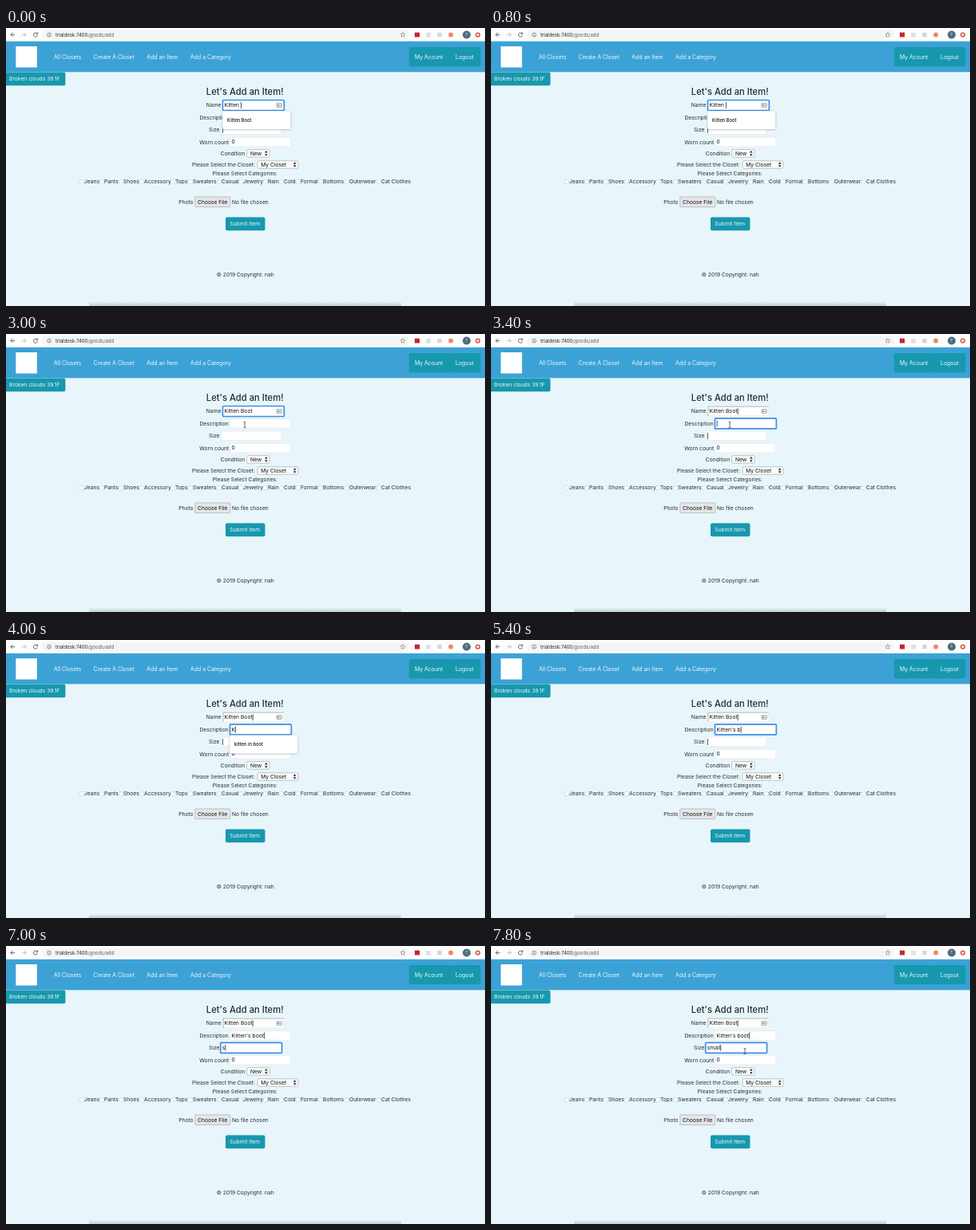
Animation of 600 by 349 pixels, one loop 8000 ms. Source, as an HTML page with a canvas:

```html
<!DOCTYPE html>
<html lang="en">
<head>
<meta charset="utf-8">
<title>Add an item</title>
<style>
html, body { margin: 0; width: 100%; height: 100%; overflow: hidden; background: #e8f6fb; }
canvas { display: block; width: 600px; height: 349px; }
</style>
</head>
<body>
<canvas id="stage"></canvas>
<script>
const W = 600, H = 349, LOOP = 8000, STEP = 200;
const canvas = document.getElementById('stage');
const ctx = canvas.getContext('2d');
const ratio = window.devicePixelRatio || 1;
canvas.width = Math.round(W * ratio);
canvas.height = Math.round(H * ratio);

const FAMILY = 'Inter, Roboto, sans-serif';
const INK = '#262b2f', TEAL = '#1798ae', BODY = 6.72;
const CATEGORIES = [
  ['Jeans', 98], ['Pants', 123], ['Shoes', 147], ['Accessory', 173],
  ['Tops', 212], ['Sweaters', 234], ['Casual', 270], ['Jewelry', 297],
  ['Rain', 328], ['Cold', 348], ['Formal', 369], ['Bottoms', 397],
  ['Outerwear', 430], ['Cat Clothes', 470]
];

// Typed values: [start time, text]
const NAME = [[0, 'Kitten '], [1200, 'Kitten B'], [1600, 'Kitten Bu'], [1800, 'Kitten B'],
  [2000, 'Kitten Bo'], [2200, 'Kitten Boo'], [2400, 'Kitten Boot']];
const DESCRIPTION = "Kitten's boot";
const SIZE = 'small';

function text(str, x, y, color = INK, size = BODY, weight = 400) {
  ctx.font = `${weight} ${size}px ${FAMILY}`;
  ctx.fillStyle = color;
  ctx.fillText(str, x, y);
  return ctx.measureText(str).width;
}

function rect(x, y, w, h, color) {
  ctx.fillStyle = color;
  ctx.fillRect(x, y, w, h);
}

function box(x, y, w, h, radius, fill, stroke, line = 0.6) {
  ctx.beginPath();
  ctx.roundRect(x, y, w, h, radius);
  if (fill) { ctx.fillStyle = fill; ctx.fill(); }
  if (stroke) { ctx.strokeStyle = stroke; ctx.lineWidth = line; ctx.stroke(); }
}

function disc(x, y, r, color) {
  ctx.fillStyle = color;
  ctx.beginPath();
  ctx.arc(x, y, r, 0, 7);
  ctx.fill();
}

function lines(color, width, ...paths) {
  ctx.strokeStyle = color;
  ctx.lineWidth = width;
  ctx.beginPath();
  for (const p of paths)
    for (let i = 0; i < p.length; i += 2)
      i ? ctx.lineTo(p[i], p[i + 1]) : ctx.moveTo(p[i], p[i + 1]);
  ctx.stroke();
}

function arrow(x, dir, color) {
  lines(color, 0.9, [x - 2.6 * dir, 8.4, x + 2.6 * dir, 8.4],
    [x, 5.8, x + 2.6 * dir, 8.4, x, 11]);
}

function star(x, y, r) {
  const p = [];
  for (let i = 0; i <= 10; i++) {
    const a = i * Math.PI / 5 - Math.PI / 2, d = i % 2 ? r * 0.45 : r;
    p.push(x + d * Math.cos(a), y + d * Math.sin(a));
  }
  lines('#6b6f73', 0.55, p);
}

function drawToolbar() {
  rect(0, 0, W, 17, '#fdfdfd');
  box(45, 2.5, 460, 12, 6, '#f4f5f6');
  arrow(8.5, -1, '#55595d');
  arrow(22.5, 1, '#b9bcbf');
  ctx.strokeStyle = '#55595d';
  ctx.lineWidth = 0.9;
  ctx.beginPath();
  ctx.arc(37, 8.5, 2.6, 0.3, 5.5);
  ctx.stroke();
  lines('#55595d', 0.9, [39.6, 5.4, 39.6, 7.7, 37.4, 7.7]);
  ctx.lineWidth = 0.6;
  ctx.beginPath();
  ctx.arc(54, 8.5, 2.5, 0, 7);
  ctx.stroke();
  rect(53.7, 8, 0.7, 2, '#55595d');
  rect(53.7, 6.8, 0.7, 0.7, '#55595d');
  const w = text('trialdesk:7400', 62, 10.7, '#25282b', 6);
  text('/goods/add', 62 + w, 10.7, '#5a5e62', 6);
  star(497, 8.5, 3.2);
  rect(512, 5.6, 6.2, 5.8, '#c9252d');
  rect(526.2, 5.8, 5.8, 5.8, '#dfe1e3');
  rect(540.4, 5.8, 5.4, 5.4, '#d3d6da');
  disc(557.2, 8.5, 3, '#ee8b62');
  disc(577, 8.5, 5, '#4d6b7b');
  text('T', 575.3, 10.4, '#e6edf0', 5.2);
  disc(591, 8.5, 3.1, '#d64b40');
  disc(591, 8.5, 1.8, '#f5dedb');
}

function drawHeader() {
  rect(0, 16.7, W, 38.6, '#3ca2d5');
  rect(12.3, 23, 26.5, 26.5, '#ffffff');
  const links = [['All Closets', 60], ['Create A Closet', 109.6],
    ['Add an Item', 176.3], ['Add a Category', 231]];
  for (const [label, x] of links) text(label, x, 38.7, '#f2f9fd', 6.9);
  box(504.8, 24, 50.4, 24.3, 2, TEAL);
  box(555.2, 24, 39.3, 24.3, 2, TEAL);
  rect(555, 24.5, 0.5, 23.3, '#1c8fa9');
  text('My Acount', 512, 38.7, '#f2f9fb', 6.9);
  text('Logout', 563, 38.7, '#f2f9fb', 6.9);
  box(-3, 55.6, 77.4, 16.7, 2, TEAL);
  text('Broken clouds 39.1F', 4, 66.4, '#f2f9fb');
}

function select(x, y, w, label, labelX) {
  box(x, y, w, 9.6, 1.8, '#f9fafa', '#9ea4a7', 0.6);
  text(label, labelX, y + 7.2, '#111');
  const ax = x + w - 4.3, ay = y + 4.8;
  ctx.fillStyle = '#222';
  for (const d of [-1, 1]) {
    ctx.beginPath();
    ctx.moveTo(ax - 1.8, ay + 0.8 * d);
    ctx.lineTo(ax + 1.8, ay + 0.8 * d);
    ctx.lineTo(ax, ay + 3.3 * d);
    ctx.fill();
  }
}

function field(x, y, value, focused, caret, dark) {
  rect(x, y, 76.3, 12.4, '#ffffff');
  if (focused) {
    box(x - 0.3, y - 0.3, 76.9, 13, 1, null, '#3f8fe0', 1.7);
  } else {
    box(x + 0.3, y + 0.3, 75.7, 11.8, 0, null, '#d9e0e3', 0.6);
    if (dark) lines('#9ca5aa', 0.7, [x + 0.3, y + 12, x + 0.3, y + 0.3, x + 76, y + 0.3]);
  }
  const w = text(value, x + 1.8, y + 8.5, '#111');
  if (caret) rect(x + 2 + w, y + 2.3, 0.7, 8, '#111');
}

function contactIcon(x, y) {
  box(x, y, 6.4, 4.8, 0.5, '#f7f8f8', '#85898c', 0.7);
  rect(x + 1.1, y + 1.2, 1.6, 2.4, '#85898c');
  rect(x + 3.4, y + 1.3, 2, 0.6, '#85898c');
  rect(x + 3.4, y + 2.8, 2, 0.6, '#85898c');
}

function suggestion(x, y, label) {
  ctx.save();
  ctx.shadowColor = 'rgba(0,0,0,.32)';
  ctx.shadowBlur = 2.5 * ratio;
  ctx.shadowOffsetY = 0.6 * ratio;
  box(x, y, 85, 22.8, 1.5, '#ffffff');
  ctx.restore();
  text(label, x + 5.8, y + 13.5, '#111', 5.75, 500);
}

function pointer(x, y) {
  lines('#33383b', 0.75, [x, y - 3, x, y + 3],
    [x - 1.5, y - 3.7, x, y - 3, x + 1.5, y - 3.7],
    [x - 1.5, y + 3.7, x, y + 3, x + 1.5, y + 3.7]);
}

function drawForm(s) {
  text("Let's Add an Item!", 250.8, 83.8, INK, 11.2, 500);
  text('Name', 250.8, 99.4);
  text('Description', 242.4, 114.9);
  text('Size', 254, 130.2);
  text('Worn count', 242.3, 145.5);
  field(271.8, 90.8, s.name, s.focus === 0, s.caret, true);
  contactIcon(339, 94.6);
  field(280.8, 106.2, s.description, s.focus === 1, s.caret);
  field(269, 121.6, s.size, s.focus === 2, s.caret);
  field(280.8, 136.9, '0', false, false);

  text('Condition', 268.8, 159.8);
  select(301.6, 152.6, 28.6, 'New', 306);
  text('Please Select the Closet:', 233, 174);
  select(315, 166.7, 51, 'My Closet', 319.2);
  text('Please Select Categories:', 258.8, 184.6);
  for (const [label, x] of CATEGORIES) {
    box(x - 5.6, 190.7, 5, 5, 0.8, '#fbfdfd', '#bcc5c9', 0.5);
    text(label, x, 195.4);
  }

  text('Photo', 216.2, 220.7);
  box(236.8, 212, 44, 12.6, 0.5, '#e4e6e7', '#a6abae', 0.7);
  text('Choose File', 240, 220.7, '#111');
  text('No file chosen', 283, 220.7);
  box(275, 237.6, 49.5, 16.6, 2, TEAL);
  text('Submit Item', 280.3, 248.4, '#f2f9fb');
  text('© 2019 Copyright: nah', 263.8, 311.6);
}

function drawBottomShade() {
  const fade = ctx.createLinearGradient(0, 343.5, 0, H);
  fade.addColorStop(0, 'rgba(130,145,152,0)');
  fade.addColorStop(1, 'rgba(130,145,152,.4)');
  rect(104, 343.5, 391, 5.5, fade);
}

const typed = (str, t, start, gap) =>
  str.slice(0, Math.max(0, Math.floor((t - start) / gap + 1e-6) + 1));

function pointerAt(t) {
  if (t >= 2600 && t < 4000) return [299, 114 - Math.max(0, 3000 - t) / 50];
  if (t >= 6200 && t < 7000) {
    const k = Math.min(1, Math.max(0, (t - 6400) / 400));
    return [299 + 13 * k, 124 + 5 * k - Math.max(0, 6400 - t) / 40];
  }
  if (t >= 7600) return [318, 132];
  return null;
}

function stateAt(t) {
  const focus = t < 3200 ? 0 : t < 6800 ? 1 : 2;
  const name = NAME.filter(([start]) => start <= t).pop()[1];
  const description = t < 4000 ? '' : typed(DESCRIPTION, t, 4000, 1400 / 9);
  const size = t < 7000 ? '' : typed(SIZE, t, 7000, 200);
  const idle = (t >= 2800 && t < 3200) || (t >= 3600 && t < 4000) || (t >= 6400 && t < 6800);
  return { focus, name, description, size, caret: !idle };
}

function draw(t) {
  const s = stateAt(t);
  ctx.setTransform(ratio, 0, 0, ratio, 0, 0);
  rect(0, 0, W, H, '#e8f6fb');
  drawToolbar();
  drawHeader();
  drawForm(s);
  drawBottomShade();
  if (t < 2600 && 'Kitten Boot'.startsWith(s.name)) suggestion(271.3, 104.2, 'Kitten Boot');
  if (s.focus === 1 && s.description && 'Kitten in boot'.startsWith(s.description))
    suggestion(280.3, 119.6, 'kitten in boot');
  const p = pointerAt(t);
  if (p) pointer(...p);
}

function tick() {
  const t = performance.now() % LOOP;
  draw(Math.floor(t / STEP) * STEP);
  requestAnimationFrame(tick);
}
tick();
</script>
</body>
</html>
```
